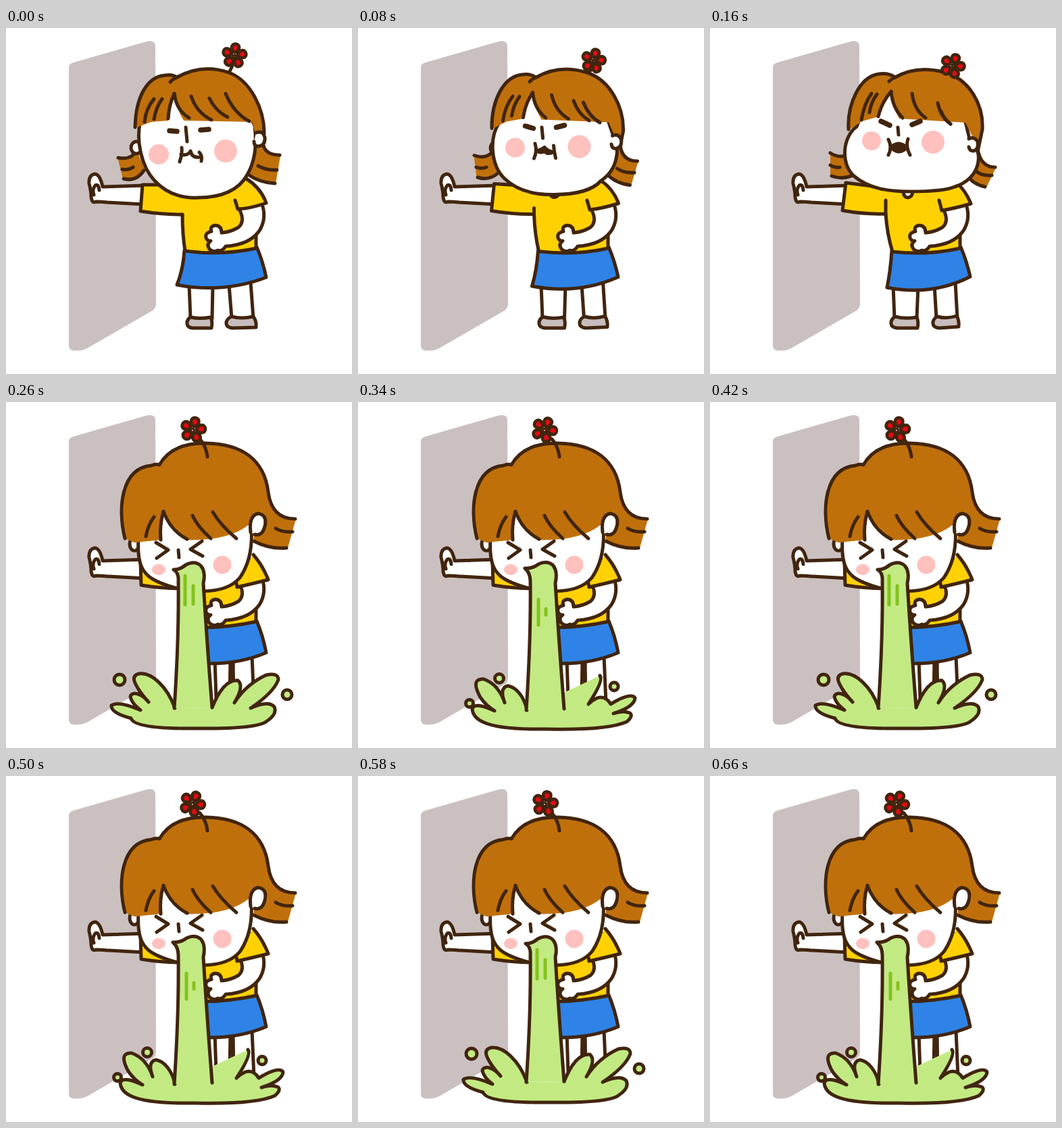
An HTML page that plays this animation: 512 by 512 pixels, repeating every 0.74 s.

```html
<!DOCTYPE html>
<html lang="en">
<head>
<meta charset="utf-8">
<style>
html, body { margin: 0; width: 100%; height: 100%; overflow: hidden; background: #fff; }
svg { display: block; width: 100vw; height: 100vh; }
path { stroke: #41250f; stroke-width: 5; stroke-linecap: round; stroke-linejoin: round; fill: none; }
.wall { fill: #cbc0c0; stroke: none; }
.skin { fill: #fff; }
.shirt { fill: #ffd103; }
.skirt { fill: #2f83e6; }
.shoe { fill: #c8bdbd; }
.hair { fill: #c0700b; stroke: none; }
.blush { fill: #ffc1be; stroke: none; }
.eye { stroke-width: 7.5; }
.dark { fill: #41250f; }
.petal { fill: #e60a12; stroke-width: 4.6; }
.dot { fill: #f3b9a8; stroke-width: 3; }
.goo { fill: #c3ea82; }
.streak { stroke: #85c11f; }
</style>
</head>
<body>
<svg viewBox="0 0 512 512"><g id="base"></g><g id="hold"></g><g id="sick"></g></svg>
<script>
const LOOP = 740;
const NS = 'http://www.w3.org/2000/svg';

const oval = (x, y, rx, ry = rx) =>
  `M${x - rx} ${y} a${rx} ${ry} 0 1 0 ${2 * rx} 0 a${rx} ${ry} 0 1 0 ${-2 * rx} 0`;

// Blend two paths that share the same commands.
function mix(a, b, t) {
  const to = b.match(/-?\d+(\.\d+)?/g);
  let i = 0;
  return a.replace(/-?\d+(\.\d+)?/g, n => +n + (to[i++] - n) * t);
}

// Each part is [class, first pose, second pose]; a missing second pose means no change.
function build(id, parts) {
  const group = document.getElementById(id);
  const nodes = parts.map(([name]) => {
    const p = document.createElementNS(NS, 'path');
    p.setAttribute('class', name);
    group.appendChild(p);
    return p;
  });
  return {
    show(on) { group.style.display = on ? '' : 'none'; },
    pose(t) {
      parts.forEach(([, a, b], i) => nodes[i].setAttribute('d', b ? mix(a, b, t) : a));
    }
  };
}

function petals(x, y, turn, size) {
  let d = '';
  for (let i = 0; i < 5; i++) {
    const a = turn + i * Math.PI * 2 / 5;
    const at = (r, k) => `${(x + Math.cos(a + k) * r * size).toFixed(1)} ${(y + Math.sin(a + k) * r * size).toFixed(1)}`;
    d += `M${at(5, 0)} C${at(12, -0.75)} ${at(20.5, -0.4)} ${at(19, 0)} C${at(20.5, 0.4)} ${at(12, 0.75)} ${at(5, 0)} Z `;
  }
  return d;
}

const arm = 'M346 270 Q354 286 344 295 Q332 302 319 303 Q319 292 309 292 Q301 294 304 301 Q294 303 296 311 Q299 316 303 315 Q296 320 301 327 Q307 333 313 329 Q320 331 325 323 Q360 321 375 300 Q386 282 379 261';

const base = build('base', [
  ['wall', 'M93 58 Q93 53 100 51 L208 20 Q220 17 221 26 L222 408 Q222 414 217 418 L120 474 Q110 479 98 477 Q93 476 93 470 Z'],
  ['skin', 'M205 233 L143 235 Q139 216 131 216 Q122 218 123 230 Q126 242 126 250 Q127 260 133 257 Q140 257 150 258 L205 261'],
  ['line', 'M130 247 Q127 239 132 233 Q137 230 138 240']
]);

const hold = build('hold', [
  ['skin', 'M271 380 L273 430 L305 430 L306 380', 'M271 380 L273 430 L306 430 L308 380'],
  ['skin', 'M330 380 L334 430 L366 430 L362 376', 'M332 380 L335 430 L366 430 L363 376'],
  ['shoe', 'M273 428 Q287 431 303 428 Q306 435 304 444 L276 444 Q267 443 268 435 Q269 430 273 428 Z', 'M274 427 Q288 431 306 428 Q309 435 307 444 L277 444 Q267 443 268 435 Q269 430 274 427 Z'],
  ['shoe', 'M334 427 Q348 431 366 427 Q371 434 370 443 L335 444 Q325 443 326 435 Q328 429 334 427 Z', 'M337 427 Q350 431 365 426 Q369 433 368 442 L339 444 Q329 443 330 435 Q331 429 337 427 Z'],
  ['skirt', 'M264 329 Q262 358 253 380 Q322 393 385 369 Q380 345 371 324 Z', 'M269 329 Q267 360 262 384 Q328 397 385 368 Q380 345 371 324 Z'],
  ['shirt', 'M202 232 L199 271 Q230 276 261 276 Q261 305 265 330 Q320 337 370 326 L370 290 L360 262 L352 226 L240 232 Z', 'M201 229 L196 270 Q230 276 260 275 Q262 305 270 331 Q320 337 370 326 L370 290 L360 262 L360 232 L240 234 Z'],
  ['line', 'M261 276 L261 278', 'M260 275 Q257 265 260 255'.replace('Q257 265', 'L').replace('L 260', 'L260')],
  ['skin', arm],
  ['shirt', 'M354 222 Q377 236 385 259 Q362 267 343 268 L339 255', 'M366 230 Q379 242 386 260 Q362 267 343 270 L339 255'],
  ['skin', 'M282 248 Q285 250 288 250 Q292 250 294 248', 'M286 243 Q287 251 293 251 Q299 250 300 243'],
  // side tails
  ['hair', 'M165 192 Q185 194 193 181 L206 210 Q196 228 173 223 Z', 'M178 185 Q190 192 203 188 L212 220 Q194 226 178 220 Z'],
  ['line', 'M166 192 Q186 196 194 180', 'M178 185 Q190 193 203 188'],
  ['line', 'M172 209 Q181 211 188 206', 'M178 203 Q184 207 192 206'],
  ['line', 'M174 223 Q192 228 204 211', 'M180 219 Q196 225 211 218'],
  ['hair', 'M367 180 Q364 203 355 214 Q374 229 399 231 L406 189 Q384 186 380 168 Z', 'M394 172 Q395 200 379 215 Q390 231 409 236 L423 207 Q402 204 398 178 Z'],
  ['line', 'M380 168 Q381 188 405 188', 'M396 178 Q400 206 422 206'],
  ['line', 'M373 204 Q385 211 401 210', 'M394 212 Q402 219 417 218'],
  ['line', 'M357 216 Q375 229 398 230', 'M379 216 Q388 231 407 235'],
  // head
  ['skin', oval(193, 177, 8, 9), oval(215, 178, 8, 9)],
  ['skin', 'M199 138 C192 165 200 205 220 226 C240 248 265 252 285 251 C318 251 345 240 357 217 C370 195 371 170 368 145 L340 85 L225 85 Z', 'M217 146 C197 160 192 200 213 219 C235 238 265 242 295 242 C325 242 350 240 362 235 C399 224 408 184 384 164 L365 85 L240 85 Z'],
  ['hair', 'M191 148 C192 100 210 72 235 70 Q246 68 253 73 Q290 52 330 66 C362 78 382 120 382 155 L370 160 L364 139 L263 137 Q252 120 250 98 Q242 115 240 137 L215 139 Z', 'M205 151 C203 115 220 72 250 68 Q264 66 274 73 Q305 55 345 65 C385 75 405 115 403 150 L398 180 L378 140 L280 134 Q270 118 269 95 Q255 112 250 131 L225 138 Z'],
  ['line', 'M191 147 C192 100 210 72 235 70 Q246 68 253 73 Q290 52 330 66 C362 78 382 120 382 155 L382 156', 'M205 150 C203 115 220 72 250 68 Q264 66 274 73 Q305 55 345 65 C385 75 405 115 403 150 L397 179'],
  ['line', 'M253 73 Q246 76 243 80', 'M274 73 Q269 75 265 79'],
  ['line', 'M205 139 Q207 119 219 105', 'M224 136 Q228 112 239 97'],
  ['line', 'M219 135 Q222 117 231 105', 'M236 125 Q238 110 247 98'],
  ['line', 'M249 97 Q241 114 240 134', 'M268 94 Q254 110 249 131'],
  ['line', 'M249 97 Q252 122 271 133', 'M268 94 Q270 118 285 133'],
  ['line', 'M274 101 Q282 125 304 136', 'M299 97 Q302 121 319 133'],
  ['line', 'M301 104 Q310 123 328 132', 'M337 111 Q341 131 356 142'],
  ['line', 'M325 97 Q337 126 360 138', 'M342 123 Q346 135 356 142'],
  ['skin', 'M370 155 Q380 151 383 162 Q384 174 373 175 Q367 175 367 168', 'M383 164 Q391 160 396 168 Q398 180 390 182 Q384 182 383 176'],
  ['blush', oval(226, 187, 15), oval(239, 167, 14)],
  ['blush', oval(325, 182, 17), oval(330, 169, 17)],
  ['eye', 'M242 152 L253 153', 'M253 138 L266 144'],
  ['eye', 'M288 151 L300 150', 'M299 143 L311 138'],
  ['line', 'M266 147 L268 168', 'M278 147 L279 158'],
  ['line', 'M260 177 Q261 188 257 198', 'M264 165 Q270 176 264 188'],
  ['line', 'M286 184 Q291 189 289 197', 'M293 164 Q289 175 296 188'],
  ['dark', 'M259 187 Q269 190 273 182 Q275 193 288 191 Q275 193 273 182 Q269 190 259 187 Z', 'M268 176 Q272 172 279 171 Q286 172 291 176 Q287 183 279 183 Q272 182 268 176 Z'],
  ['line', 'M335 56 L330 66', 'M358 62 L354 66'],
  ['petal', petals(338, 41, -1.45, 0.92), petals(359, 56, -1.2, 0.92)],
  ['dot', oval(338, 42, 2), oval(360, 56, 2)]
]);

const sick = build('sick', [
  ['skin', 'M309 380 L311 440 L331 440 L332 380'],
  ['skin', 'M336 380 L337 446 L367 446 L364 376'],
  ['skirt', 'M270 329 L264 384 Q330 394 385 371 Q380 345 371 324 Z'],
  ['shirt', 'M199 236 L200 271 Q230 276 262 276 Q265 305 270 333 Q320 336 370 325 L370 290 L360 262 L360 232 Z'],
  ['skin', arm],
  ['shirt', 'M366 226 Q380 242 388 263 Q364 269 342 274 L340 264'],
  ['skin', oval(190, 210, 7, 10)],
  ['skin', 'M196 203 C194 235 200 252 217 262 C250 281 320 291 346 260 C360 240 365 215 363 185 L330 120 L215 145 Z'],
  ['hair', 'M176 202 C165 158 170 98 215 94 Q222 91 227 93 Q246 60 296 61 C350 62 382 86 388 133 Q393 173 429 173 L417 216 Q390 220 366 206 L369 185 L360 181 Q330 206 266 204 Q242 188 233 163 Q228 180 229 204 L190 208 Z'],
  ['line', 'M176 202 C165 158 170 98 215 94 Q222 91 227 93 Q246 60 296 61 C350 62 382 86 388 133 Q393 173 428 173'],
  ['line', 'M399 187 Q408 193 424 192'],
  ['line', 'M367 206 Q390 218 415 216'],
  ['line', 'M207 199 Q210 182 219 170'],
  ['line', 'M233 162 Q227 182 229 204'],
  ['line', 'M233 162 Q243 190 268 203'],
  ['line', 'M276 168 Q283 184 303 202'],
  ['line', 'M306 163 Q318 183 341 202'],
  ['skin', 'M362 193 Q359 168 373 165 Q387 167 383 184 Q379 199 368 196'],
  ['blush', oval(226, 248, 10, 8)],
  ['blush', oval(320, 241, 13.5)],
  ['line', 'M222 208 L240 219 L223 231'],
  ['line', 'M290 206 L273 218 L291 228'],
  ['line', 'M255 219 L256 230'],
  ['line', 'M287 55 Q296 65 298 81'],
  ['petal', petals(277, 41, -1.35, 0.95), petals(276, 41, -1.15, 0.95)],
  ['dot', oval(276, 42, 2.5)],
  // puddle, stream and drops
  ['goo',
    'M250 453 C238 420 215 400 197 402 C184 405 190 416 198 428 Q206 439 211 444 C200 430 186 428 184 436 Q186 446 199 456 Q166 442 156 449 Q155 460 185 468 Q190 484 280 483 Q370 484 385 473 Q402 462 397 451 Q388 441 362 453 Q396 430 403 411 Q403 400 385 404 Q355 418 338 445 Q353 420 343 412 Q322 410 305 452',
    'M250 456 C246 436 234 422 222 420 C211 422 213 434 217 445 Q208 418 186 410 C168 409 175 426 181 437 Q190 450 202 457 Q172 443 169 454 Q170 467 186 474 Q210 485 280 484 Q370 486 398 473 Q408 464 402 460 Q392 456 378 461 Q409 451 410 438 Q404 429 374 447 Q366 434 354 438 Q347 441 341 447 Q364 412 358 405 Q328 402 305 454'],
  ['goo',
    'M249 453 Q256 350 255 265 Q256 253 248 248 Q258 248 266 241 Q279 234 288 242 Q296 251 292 268 Q297 350 305 452',
    'M249 456 Q256 350 255 265 Q255 253 247 246 Q258 247 267 240 Q279 234 288 241 Q296 250 292 268 Q297 350 305 454'],
  ['streak', 'M265 257 L265 300', 'M267 292 L267 330'],
  ['streak', 'M277 272 L277 299', 'M278 306 L278 315'],
  ['goo', oval(168, 411, 8), oval(209, 409, 6.5)],
  ['goo', oval(416, 433, 7), oval(379, 421, 6)],
  ['goo', oval(-30, 446, 5.5), oval(165, 446, 5.5)]
]);

base.pose(0);

function draw(ms) {
  const t = ms % LOOP;
  const retching = t >= 260;
  hold.show(!retching);
  sick.show(retching);
  if (retching) sick.pose(Math.floor((t - 260) / 80) % 2);
  else hold.pose(t < 80 ? 0 : t < 160 ? 0.5 : 1);
}

const start = performance.now();
function tick() {
  draw(performance.now() - start);
  requestAnimationFrame(tick);
}
draw(0);
requestAnimationFrame(tick);
</script>
</body>
</html>
```
